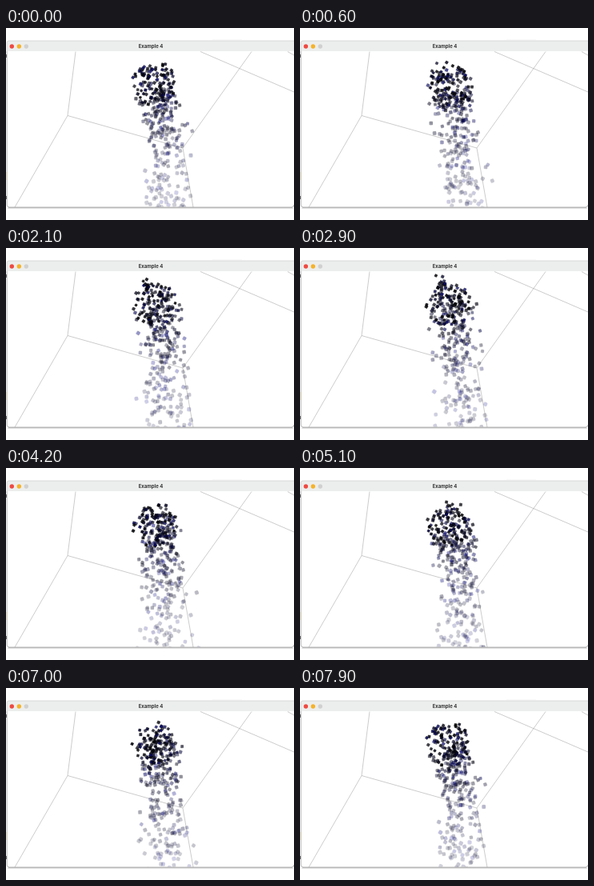
Recreate the animation shown at these times as an HTML page with a canvas. Size 360 by 240 pixels, loop 8000 ms.

```html
<!DOCTYPE html>
<html lang="en">
<head>
<meta charset="utf-8">
<title>Example 4</title>
<style>
html, body { margin: 0; width: 100%; height: 100%; overflow: hidden; background: #fff; }
#stage { position: relative; width: 360px; height: 240px; overflow: hidden; }
svg, canvas { position: absolute; left: 0; top: 0; }
.room { fill: none; stroke: #999; stroke-width: .5; }
text { font: 700 6px Inter, "Liberation Sans", sans-serif; fill: #333; text-anchor: middle; }
</style>
</head>
<body>
<div id="stage">
  <svg width="360" height="240">
    <path d="M258 14.7H295" stroke="#eee" stroke-width=".5"/>
    <path d="M1 29V18.5Q1 16 3.5 16H360V29Z" fill="#eceeed"/>
    <path d="M1.2 29V18.5Q1.2 16 3.5 16H360" fill="none" stroke="#c8c8c8" stroke-width=".6"/>
    <path d="M1.2 29V221Q1.2 224 4 224H357Q360 224 360 221" fill="none" stroke="#a8a8a8" stroke-width=".8"/>
    <path d="M3 224.6H358" stroke="#aaa" stroke-width=".8"/>
    <path d="M2 225.5H359" stroke="#e2e2e2"/>
    <circle cx="7.3" cy="23" r="2.7" fill="#ee4a43"/>
    <circle cx="16.3" cy="23" r="2.7" fill="#f6b229"/>
    <circle cx="25.3" cy="23" r="2.7" fill="#d0d0d0"/>
    <text x="181" y="25">Example 4</text>
    <path class="room" d="M87 29.5L77 109.5L221 150L234 224M77 109.5L11 224M221 150L307 29.5M243 29.5L360 80M352 29.5L360 34"/>
    <path d="M0 33V37M0 210V214" stroke="#444" stroke-width="1.6"/>
    <path d="M0 180V190" stroke="#e5dcae" stroke-width="1.4"/>
  </svg>
  <canvas id="view" width="360" height="240"></canvas>
</div>
<script>
const LOOP = 8, LIFE = 3, COUNT = 1050, STEP = 0.1;
const ctx = document.getElementById('view').getContext('2d');

let seed = 4127;
function rand() {
  seed = (seed * 1664525 + 1013904223) % 4294967296;
  return seed / 4294967296;
}
const spread = r => (rand() * 2 - 1) * r;

const boxes = Array.from({ length: COUNT }, (_, i) => {
  const birth = i / COUNT * LOOP;
  const angle = rand() * Math.PI * 2;
  const radius = Math.sqrt(rand()) * 28;
  const box = {
    birth,
    x: 184 + Math.cos(angle) * radius,
    y: 71 + Math.sin(angle) * radius,
    vx: 23 + spread(22),
    vy: -45 + spread(12),
    drop: 262 + spread(16),
    size: 2.9 + spread(0.35),
    turn: rand() * Math.PI,
    spin: spread(2.5),
    blue: rand()
  };
  // Occasional plumes rise above the main cloud.
  const plume = birth > 1.6 && birth < 2.7 ? 0.12 : 0.01;
  if (rand() < plume) {
    box.x = 172 + spread(5);
    box.y = 45 + spread(9);
  }
  // Keep the falling column centred.
  box.vx -= (box.x - 184) * 0.15;
  return box;
});

function face(x, y, w, h, r) {
  ctx.beginPath();
  ctx.roundRect(x, y, w, h, r);
}

function drawBox(b, age) {
  const u = age / LIFE;
  const x = b.x + b.vx * u;
  const y = b.y + b.vy * u + b.drop * u * u;
  if (y > 230) return;
  const s = b.size + 2.2 * u;
  const h = s / 2;
  const r = s * 0.35 * u;
  const fade = 1 - u;
  const tint = Math.round(10 + 100 * b.blue ** 3 + 50 * u);
  ctx.save();
  ctx.translate(x, y);
  ctx.rotate(Math.sin(b.turn + b.spin * age) * 0.45);
  ctx.transform(1, 0.12, -0.1, 1, 0, 0);
  ctx.fillStyle = `rgb(8,8,${tint})`;
  ctx.strokeStyle = '#000';
  ctx.lineWidth = 0.5;
  // Two translucent faces make the depth of the cube visible.
  ctx.globalAlpha = 0.12 + 0.78 * fade * fade;
  face(-h, -h, s, s, r);
  ctx.fill();
  ctx.globalAlpha *= 0.5;
  face(-h + 0.6, -h - 0.5, s * 0.9, s, r);
  ctx.fill();
  ctx.globalAlpha = 0.06 + 0.7 * fade ** 3;
  face(-h, -h, s, s, r);
  ctx.stroke();
  ctx.restore();
}

function draw(now) {
  const time = Math.floor(now / 1000 % LOOP / STEP + 1e-6) * STEP;
  ctx.clearRect(0, 0, 360, 240);
  ctx.save();
  ctx.beginPath();
  ctx.rect(1, 29.5, 359, 194);
  ctx.clip();
  boxes
    .map(b => ({ b, age: (time - b.birth + LOOP) % LOOP }))
    .filter(p => p.age < LIFE)
    .sort((p, q) => q.age - p.age)
    .forEach(p => drawBox(p.b, p.age));
  ctx.restore();
}

const start = performance.now();
function tick() {
  draw(performance.now() - start);
  requestAnimationFrame(tick);
}
draw(0);
requestAnimationFrame(tick);
</script>
</body>
</html>
```
